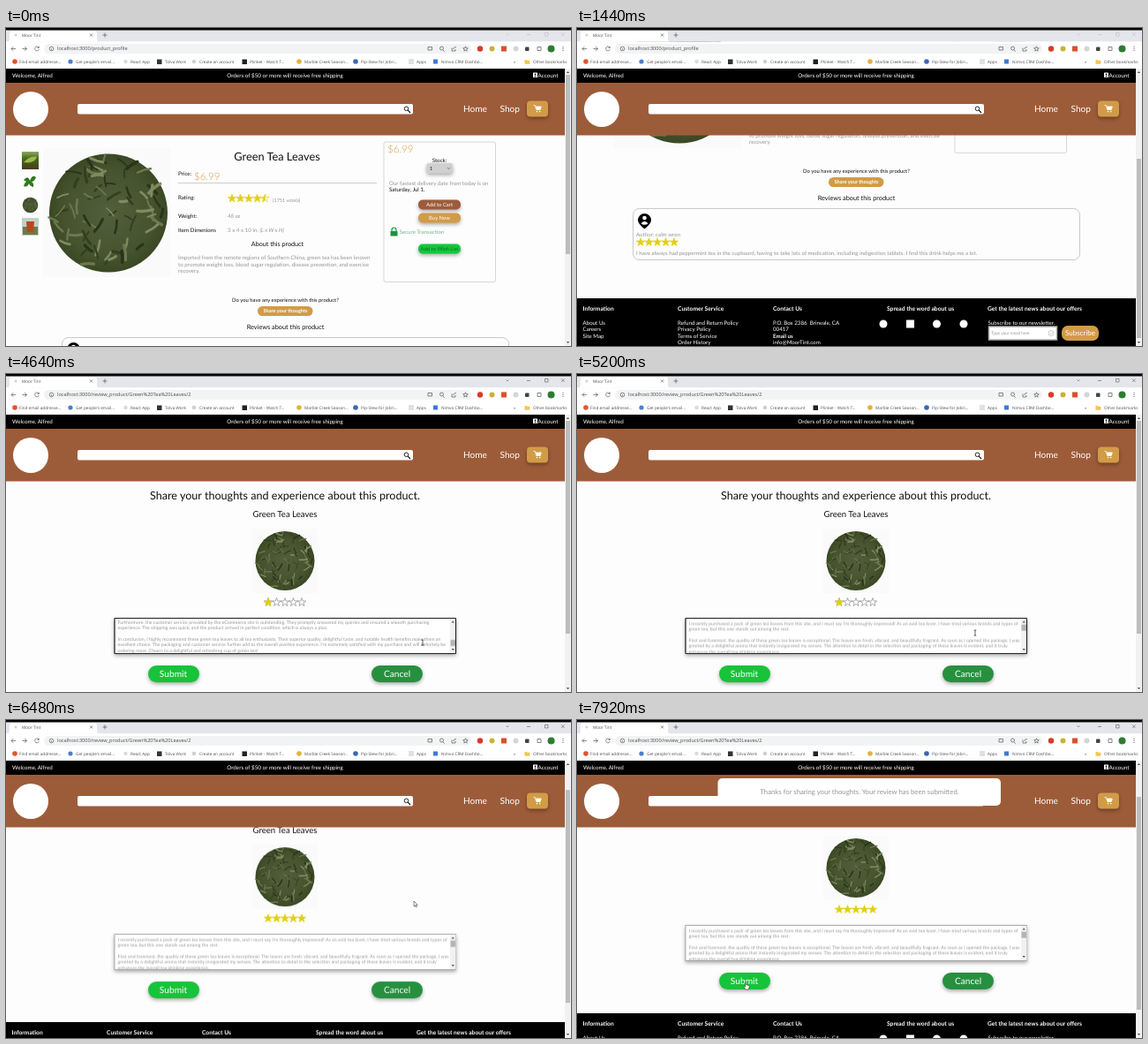
An HTML page that plays this animation: 640x360 px, repeating every 8 s.

```html
<!DOCTYPE html>
<html lang="en">
<head>
<meta charset="utf-8">
<title>Moor Tint</title>
<style>
html, body { margin: 0; width: 100%; height: 100%; overflow: hidden; background: #fdfdfd; }
svg { display: block; width: 640px; height: 360px; }
text { font-family: Lato, "Open Sans", sans-serif; font-size: 6.2px; fill: #111; text-rendering: geometricPrecision; white-space: pre; }
.ui text { font-family: "Open Sans", "Noto Sans", sans-serif; font-size: 4.7px; fill: #4a4d51; }
.mid { text-anchor: middle; }
.grey, .grey text { fill: #959595; }
.white, .white text { fill: #fff; }
.bold { font-weight: 700; }
.gold { fill: #d29b48; }
.price { font-size: 11.5px; font-weight: 300; }
.head text { font-size: 6.7px; font-weight: 700; }
.note text { font-size: 5.25px; fill: #969696; }
.lift { filter: drop-shadow(0 2px 2px #0005); }
.line { fill: none; stroke: #555; stroke-width: .7; }
.lit { fill: #dfd010; stroke: #dfd010; stroke-width: .6; }

/* hard switches */
.step { animation: 8s step-end infinite; }
.pageA { animation-name: pageA; }
.pageB { animation-name: pageB; }
.active { animation-name: active; }
.focus { animation-name: focus; }
.hint { animation-name: hint; }
.filled { animation-name: filled; }
.rated { animation-name: rated; }
.hand { animation-name: hand; }
.beam { animation-name: beam; }
.arrow { animation-name: arrow; }
@keyframes pageA { 0% { opacity: 1 } 28% { opacity: 0 } }
@keyframes pageB { 0% { opacity: 0 } 28% { opacity: 1 } }
@keyframes active { 0% { opacity: .25 } 23% { opacity: .85 } }
@keyframes focus { 0% { opacity: 0 } 38% { opacity: 1 } 74% { opacity: 0 } }
@keyframes hint { 0% { opacity: 1 } 47% { opacity: 0 } }
@keyframes filled { 0% { opacity: 0 } 47% { opacity: 1 } }
@keyframes rated { 0% { opacity: 0 } 73% { opacity: 1 } }
@keyframes hand { 0% { opacity: 0 } 20% { opacity: 1 } 28% { opacity: 0 } 73% { opacity: 1 } 77% { opacity: 0 } 90.8% { opacity: 1 } }
@keyframes beam { 0% { opacity: 0 } 31% { opacity: 1 } 66.5% { opacity: 0 } }
@keyframes arrow { 0% { opacity: 0 } 28% { opacity: 1 } 31% { opacity: 0 } 66.5% { opacity: 1 } 73% { opacity: 0 } 77% { opacity: 1 } 90.8% { opacity: 0 } }

/* smooth moves; --d is the full distance */
.scrollA { animation: scrollA 8s linear infinite; }
.scrollB { animation: scrollB 8s linear infinite; }
.scrollT { animation: scrollT 8s linear infinite; }
.toast { animation: toast 8s ease-out infinite; }
.ptr { animation: ptr 8s ease-in-out infinite; }
@keyframes scrollA {
  0%, 11.5% { transform: translateY(0); animation-timing-function: ease-in-out }
  18%, 100% { transform: translateY(var(--d)) }
}
@keyframes scrollB {
  0%, 77.5% { transform: translateY(0) }
  81%, 82% { transform: translateY(calc(var(--d) * .77)) }
  86%, 100% { transform: translateY(var(--d)) }
}
@keyframes scrollT {
  0%, 58.3% { transform: translateY(var(--d)) }
  64%, 100% { transform: translateY(0) }
}
@keyframes toast {
  0%, 93.7% { transform: translateY(-15px); opacity: 0 }
  98.5%, 100% { transform: translateY(0); opacity: 1 }
}
@keyframes ptr {
  0%, 22% { transform: translate(322px, 174px) }
  28% { transform: translate(318px, 176px) }
  32.5%, 47% { transform: translate(216px, 282px) }
  57%, 59% { transform: translate(472px, 304px) }
  65% { transform: translate(451px, 293px) }
  68% { transform: translate(400px, 335px) }
  69.5% { transform: translate(384px, 322px) }
  73.5%, 76.5% { transform: translate(336px, 257px) }
  80.5%, 82% { transform: translate(462px, 205px) }
  88.5% { transform: translate(456px, 296px) }
  92%, 100% { transform: translate(191px, 297px) }
}
</style>
</head>
<body>
<svg viewBox="0 0 640 360">
<defs>
  <radialGradient id="leafy">
    <stop offset="0" stop-color="#525f3c"/><stop offset=".75" stop-color="#46532f"/><stop offset="1" stop-color="#3a4823"/>
  </radialGradient>
  <linearGradient id="field" x2="0" y2="1">
    <stop offset="0" stop-color="#8ea860"/><stop offset=".4" stop-color="#3f6a1e"/><stop offset="1" stop-color="#4a3a1c"/>
  </linearGradient>
  <clipPath id="box"><rect x="124" y="277" width="378" height="38.5"/></clipPath>
  <path id="star" d="M0-5L1.2-1.6 4.8-1.5 1.9.6 2.9 4 0 2-2.9 4-1.9.6-4.8-1.5-1.2-1.6Z"/>
  <g id="five">
    <use href="#star" x="-19"/><use href="#star" x="-9.5"/><use href="#star"/><use href="#star" x="9.5"/><use href="#star" x="19"/>
  </g>
  <g id="tea"><circle r="67" fill="url(#leafy)"/></g>
  <g id="footer">
    <rect width="634" height="70"/>
    <g class="white">
      <g class="head">
        <text x="6.5" y="13.8">Information</text>
        <text x="114" y="13.8">Customer Service</text>
        <text x="222" y="13.8">Contact Us</text>
        <text x="351" y="13.8">Spread the word about us</text>
        <text x="465" y="13.8">Get the latest news about our offers</text>
      </g>
      <text x="6.5" y="29.5">About Us</text>
      <text x="6.5" y="37">Careers</text>
      <text x="6.5" y="44.5">Site Map</text>
      <text x="114" y="29.5">Refund and Return Policy</text>
      <text x="114" y="37">Privacy Policy</text>
      <text x="114" y="44.5">Terms of Service</text>
      <text x="114" y="52">Order History</text>
      <text x="222" y="29.5">P.O. Box 2386  Brinvale, CA</text>
      <text x="222" y="37">00417</text>
      <text x="222" y="44.5" class="bold">Email us</text>
      <text x="222" y="52">info@MoorTint.com</text>
      <circle cx="347" cy="29" r="4.5"/><rect x="373" y="24.5" width="9" height="9"/>
      <circle cx="407.5" cy="29" r="4.5"/><circle cx="438" cy="29" r="4.5"/>
      <text x="465.5" y="29.5">Subscribe to our newsletter.</text>
    </g>
    <rect x="466.5" y="32" width="77" height="15" fill="#fff" stroke="#aaa" stroke-width="1.5"/>
    <text x="469" y="41" class="grey" style="font-size:4.8px">Type your email here</text>
    <circle cx="537" cy="39.5" r="3" fill="none" stroke="#aaa" stroke-width=".6"/>
    <path d="M535.5 39.5l1.2 1.2 2-2.5" fill="none" stroke="#aaa" stroke-width=".6"/>
    <rect x="549" y="31" width="42" height="17" rx="7" class="gold"/>
    <text x="570" y="42.3" class="mid white" style="font-size:8px">Subscribe</text>
  </g>
</defs>

<rect width="640" height="360" fill="#fdfdfd"/>

<!-- product page -->
<g class="step pageA"><g class="scrollA" style="--d:-146px">
  <rect x="18" y="140" width="19" height="20" fill="url(#field)"/>
  <path d="M20 152q8-8 15-6-3 8-15 6z" fill="#a3b545"/>
  <path d="M20 172q5-6 7 1 3-8 7-4-2 5-5 5 3 2 2 6-4-1-5-4-2 5-6 3 1-4 3-5z" fill="#2f7a1c"/>
  <use href="#tea" transform="translate(27.5 200.5) scale(.13)"/>
  <rect x="18" y="215" width="19" height="20" fill="#c3cfc6"/>
  <path d="M19 225h17v9h-17z" fill="#6e7a4b"/><path d="M23 219h9l-1 12h-7z" fill="#b4491f"/>
  <rect x="42" y="136" width="144" height="146" fill="#fafafa"/>
  <use href="#tea" transform="translate(116 209.5)"/>

  <text x="307" y="150" class="mid" style="font-size:12.8px">Green Tea Leaves</text>
  <text x="195" y="167">Price:</text>
  <text x="213" y="172" class="gold price">$6.99</text>
  <path d="M195 175.5h225" stroke="#b8b8b8" stroke-width=".7"/>
  <text x="195" y="193.5">Rating:</text>
  <g class="lit">
    <use href="#star" x="256" y="193"/><use href="#star" x="265.5" y="193"/><use href="#star" x="275" y="193"/><use href="#star" x="284.5" y="193"/>
    <path d="M293.5 188v7l-2.9 2 1-3.4-2.9-2.1 3.6-.1z"/>
    <path d="M293.5 188l1.2 3.4 3.6.1-2.9 2.1 1 3.4-2.9-2" style="fill:none"/>
  </g>
  <text x="302" y="197" class="grey" style="font-size:5.5px">(1751 vote(s)</text>
  <text x="195" y="215">Weight:</text>
  <text x="251" y="215" class="grey" font-style="italic">48 oz</text>
  <text x="195" y="231">Item Dimenions</text>
  <text x="251" y="231" class="grey">3 x 4 x 10 in. <tspan font-style="italic">(L x W x H)</tspan></text>
  <text x="307.5" y="247" class="mid" style="font-size:7.2px">About this product</text>
  <g class="grey">
    <text x="195" y="262.3">Imported from the remote regions of Southern China, green tea has been known</text>
    <text x="195" y="269.5">to promote weight loss, blood sugar regulation, disease prevention, and exercise</text>
    <text x="195" y="276.8">recovery.</text>
  </g>

  <rect x="428" y="129" width="126.5" height="158.5" rx="2" fill="none" stroke="#c6c6c6" stroke-width=".7"/>
  <text x="432" y="141" class="gold price">$6.99</text>
  <text x="491" y="151.8" class="mid">Stock:</text>
  <rect x="476.5" y="153" width="29.5" height="11.5" rx="2.5" fill="#d0d0d0" class="lift"/>
  <text x="480" y="160.8" style="font-size:5.5px">1</text>
  <path d="M500 158l1.7 1.7 1.7-1.7" class="line"/>
  <text x="434" y="177.7" class="grey">Our fastest delivery date from today is on</text>
  <text x="434" y="185">Saturday, Jul 1.</text>
  <rect x="467" y="194.5" width="48" height="11" rx="5" fill="#9d5c39" class="lift"/>
  <text x="491" y="202.2" class="mid white" style="font-size:5.9px">Add to Cart</text>
  <rect x="467" y="209.5" width="48" height="11" rx="5" class="gold lift"/>
  <text x="491" y="217.2" class="mid white" style="font-size:5.9px">Buy Now</text>
  <path d="M437 231v-2.5a2.5 2.5 0 0 1 5 0v2.5" fill="none" stroke="#15953c" stroke-width="1.2"/>
  <rect x="435.5" y="230" width="8" height="5.5" rx=".6" fill="#15953c"/>
  <text x="445.5" y="233" style="fill:#76b38f">Secure Transaction</text>
  <rect x="467" y="244.5" width="48" height="11" rx="5" fill="#12c83c" class="lift"/>
  <text x="491" y="252.2" class="mid" style="font-size:5.9px;fill:#0b6a26">Add to Wish List</text>

  <text x="316.5" y="309.5" class="mid" style="font-size:5.9px">Do you have any experience with this product?</text>
  <rect x="285" y="315" width="62.5" height="11" rx="5.5" class="gold"/>
  <text x="316.5" y="322.3" class="mid white bold" style="font-size:5.6px">Share your thoughts</text>
  <text x="316.5" y="341" class="mid" style="font-size:7.35px">Reviews about this product</text>
  <rect x="63.5" y="350.5" width="506" height="58" rx="7" fill="none" stroke="#bbb" stroke-width=".8"/>
  <path d="M76.5 373.5q-7.5-6-7.5-10a7.5 7.5 0 0 1 15 0q0 4-7.5 10z"/>
  <g class="white"><circle cx="76.5" cy="361" r="2.3"/><path d="M72.5 367.3q4-4.5 8 0-4 3-8 0z"/></g>
  <text x="67" y="381.7" class="grey">Author: calm wren</text>
  <use href="#five" x="91" y="388.5" class="lit"/>
  <text x="67" y="402.7" class="grey" style="font-size:6.15px">I have always had peppermint tea in the cupboard, having to take lots of medication, including indigestion tablets. I find this drink helps me a lot.</text>
  <use href="#footer" y="452"/>
</g></g>

<!-- review page -->
<g class="step pageB"><g class="scrollB" style="--d:-44px">
  <rect y="121" width="634" height="260" fill="#fdfdfd"/>
  <text x="316" y="141.8" class="mid" style="font-size:12.6px">Share your thoughts and experience about this product.</text>
  <text x="316" y="161.8" class="mid" style="font-size:9.6px">Green Tea Leaves</text>
  <rect x="279" y="175" width="74" height="73" fill="#fafafa"/>
  <use href="#tea" transform="translate(316 211.5) scale(.5)"/>
  <use href="#five" x="316" y="258.5" fill="#fff" stroke="#777" stroke-width=".6"/>
  <use href="#star" x="297" y="258.5" class="lit"/>
  <g class="step rated">
    <rect x="290" y="252" width="52" height="13" fill="#fdfdfd"/>
    <use href="#five" x="316" y="258.5" class="lit"/>
  </g>

  <rect x="123" y="276.5" width="386.5" height="40" fill="#fff" stroke="#999" stroke-width=".8" class="lift"/>
  <text x="126.5" y="285.5" class="step hint" style="font-size:5.3px;fill:#aaa">Say something</text>
  <g class="step filled">
    <g clip-path="url(#box)"><g id="note" class="note scrollT"></g></g>
    <rect x="503" y="277" width="6.5" height="39" fill="#f1f1f1"/>
    <path d="M504.5 281.5l1.7-2 1.7 2zM504.5 311l1.7 2 1.7-2z" fill="#555"/>
    <rect x="503.5" y="283.7" width="5.5" height="7" fill="#b5b5b5" class="scrollT" style="--d:17.2px"/>
  </g>
  <rect x="123" y="276.5" width="386.5" height="40" rx=".8" fill="none" stroke="#222" stroke-width="1.1" class="step focus"/>

  <rect x="161" y="330" width="58" height="19" rx="9.5" fill="#17c33a" class="lift"/>
  <text x="189.5" y="343" class="mid white" style="font-size:10.2px">Submit</text>
  <rect x="414" y="330" width="58" height="19" rx="9.5" fill="#27903f" class="lift"/>
  <text x="443" y="343" class="mid white" style="font-size:10.2px">Cancel</text>
  <use href="#footer" y="376"/>
</g></g>

<!-- site header -->
<rect y="46" width="634" height="16"/>
<text x="7" y="56" class="white" style="font-size:6.3px">Welcome, Alfred</text>
<text x="316" y="56" class="mid white" style="font-size:6.3px">Orders of $50 or more will receive free shipping</text>
<rect x="597" y="50.5" width="5" height="5.5" rx=".5" class="white"/>
<circle cx="599.5" cy="52.5" r=".9"/><path d="M598 55.3q1.5-2 3 0z"/>
<text x="602.5" y="56" class="white" style="font-size:6.3px">Account</text>
<rect y="62" width="634" height="59.5" fill="#9d5c39"/>
<circle cx="28" cy="92" r="20" class="white"/>
<rect x="81" y="86" width="380" height="11.5" rx="2" class="white"/>
<path d="M455.2 93.2l2.8 2.8" stroke="#111" stroke-width="1.2"/>
<circle cx="453.5" cy="91.3" r="2.3" fill="none" stroke="#111" stroke-width=".9"/>
<text x="518" y="95" class="white" style="font-size:10.1px">Home</text>
<text x="559.5" y="95" class="white" style="font-size:10.1px">Shop</text>
<rect x="590" y="82.5" width="24" height="18" rx="4" class="gold lift"/>
<path d="M597.5 87.5h1.8l1.4 5h4.500l1.100-3.500h-6" fill="none" stroke="#fff" stroke-width=".8"/>
<g class="white"><path d="M600 89h6.300l-1.100 3.500h-4.200z"/><circle cx="601.5" cy="94.6" r=".8"/><circle cx="604.7" cy="94.6" r=".8"/></g>

<!-- page scrollbar -->
<rect x="633" y="46" width="7" height="314" fill="#f1f1f1"/>
<path d="M634.8 51l1.7-2 1.7 2zM634.8 355l1.7 2 1.7-2z" fill="#555"/>
<g class="step pageA"><rect x="634" y="53" width="5" height="203" fill="#bdbdbd" class="scrollA" style="--d:95px"/></g>
<g class="step pageB"><rect x="634" y="53" width="5" height="241" fill="#bdbdbd" class="scrollB" style="--d:34px"/></g>

<!-- browser frame -->
<g class="ui">
  <rect width="640" height="15.5" fill="#e5e6eb"/>
  <path d="M1 15.5q3 0 3-3v-6q0-3 3-3h93q3 0 3 3v6q0 3 3 3z" fill="#fff"/>
  <rect width="640" height="2.5"/>
  <circle cx="11" cy="8" r="1.5" fill="#d8cfc8"/>
  <text x="18" y="9.8">Moor Tint</text>
  <path d="M95 6.5l3 3m0-3l-3 3M109.5 8h5m-2.5-2.5v5" class="line"/>
  <path d="M566.5 6.5l1.5 1.5 1.5-1.5M590 7.5h4M610.5 5.5h3.5v3.5h-3.5zM629 5.5l3.6 3.6m0-3.6l-3.6 3.6" class="line step active"/>
  <rect y="15.5" width="640" height="30.5" fill="#fff"/>
  <rect x="43" y="18" width="484" height="11" rx="5.5" fill="#f1f3f4"/>
  <path d="M11 23.5h-5m2.3-2.3l-2.3 2.3 2.3 2.3M18.5 23.5h5m-2.3-2.3l2.3 2.3-2.3 2.3M37 22a2.4 2.4 0 1 0 .3 2.2M37.3 20.8v1.7h-1.7" class="line"/>
  <circle cx="51.5" cy="23.5" r="2.3" class="line"/><path d="M51.5 23.2v1.5" class="line"/>
  <text x="58" y="25.4" class="step pageA" style="font-size:5.6px">localhost:3000/product_profile</text>
  <text x="58" y="25.4" class="step pageB" style="font-size:5.6px">localhost:3000/review_product/Green%20Tea%20Leaves/2</text>
  <path d="M478 21.5h4.5v3.5h-4.5zM495 25l1.7 1.7M505 22.5v3.5h4v-2M506.5 24q.5-2.5 3.5-2.5M520.5 20.8l.8 1.9 2 .1-1.6 1.3.5 2-1.7-1.1-1.7 1.1.5-2-1.6-1.3 2-.1z" class="line"/>
  <circle cx="493.5" cy="23" r="2" class="line"/>
  <circle cx="537" cy="23.5" r="3.2" fill="#d93a2b"/><circle cx="550.5" cy="23.5" r="3" fill="#c9b23a"/>
  <rect x="561" y="20.5" width="6" height="6" fill="#d8512c"/><circle cx="577.5" cy="23.5" r="3" fill="#d5d5d5"/>
  <rect x="588" y="21.5" width="4.5" height="4.5" rx=".8" fill="#444"/><path d="M602 21.5h4v4h-4z" class="line"/>
  <circle cx="617.5" cy="23.5" r="4" fill="#2e7d32"/>
  <g fill="#444"><circle cx="631" cy="21.5" r=".6"/><circle cx="631" cy="23.5" r=".6"/><circle cx="631" cy="25.5" r=".6"/></g>

  <circle cx="10" cy="38" r="2.8" fill="#e0542c"/><text x="15" y="39.7">Find email addresse...</text>
  <circle cx="73" cy="38" r="2.6" fill="#4a7fd0"/><text x="79" y="39.7">Get people's email...</text>
  <circle cx="135.5" cy="38" r="2.2" fill="#dadada"/><text x="141" y="39.7">React App</text>
  <rect x="171" y="35.5" width="5.5" height="5.5" fill="#333"/><text x="180" y="39.7">Tolva Work</text>
  <circle cx="213" cy="38" r="2.2" fill="#cfcfcf"/><text x="219" y="39.7">Create an account</text>
  <rect x="267.5" y="35.5" width="5.5" height="5.5" fill="#222"/><text x="276" y="39.7">Plinket - Watch T...</text>
  <circle cx="332" cy="38" r="2.8" fill="#e3b23c"/><text x="338" y="39.7">Marble Creek Season...</text>
  <circle cx="396" cy="38" r="2.8" fill="#3c66b0"/><text x="402" y="39.7">Pip-Stew for Jobri...</text>
  <path d="M456.5 36h5m-5 2h5m-5 2h5" class="line" stroke-dasharray="1 1"/><text x="465" y="39.7">Apps</text>
  <rect x="484" y="35.5" width="5" height="5" fill="#3f78d8"/><text x="493" y="39.7">Nimvo CRM Dashbo...</text>
  <text x="575" y="39.7">»</text>
  <path d="M587.5 36h2l.8.8h3v4h-5.8z" fill="#f2c550"/><text x="597" y="39.7">Other bookmarks</text>
</g>

<g class="toast">
  <rect x="159.5" y="66" width="320.5" height="31" rx="5" fill="#fff"/>
  <text x="320" y="84.3" class="mid grey" style="font-size:7.75px">Thanks for sharing your thoughts. Your review has been submitted.</text>
</g>

<g class="ptr">
  <path class="step beam" d="M-1.3-3h2.6M0-3v6M-1.3 3h2.6" stroke="#222" stroke-width=".7"/>
  <path class="step arrow" d="M0 0v6l1.4-1.2 1 2.2 1-.5-1-2.1h1.8z" fill="#fff" stroke="#111" stroke-width=".5"/>
  <path class="step hand" d="M-.3 0q.8-.6 1.2.2v2.6l2.7.8q.8.4.5 1.5l-.6 2.9h-3.6l-2-3q.3-.9 1.3-.2l.5.4z" fill="#fff" stroke="#111" stroke-width=".5"/>
</g>
</svg>

<script>
const NS = "http://www.w3.org/2000/svg";
const add = (parent, tag, attrs) => {
  const el = parent.appendChild(document.createElementNS(NS, tag));
  for (const k in attrs) el.setAttribute(k, attrs[k]);
  return el;
};

// loose tea: seeded flakes on the disc
let seed = 7;
const rnd = () => (seed = seed * 16807 % 2147483647) / 2147483647;
const tones = ["#28341a", "#6b7850", "#323f20", "#7f8b5f"];
const tea = document.getElementById("tea");
for (let i = 0; i < 72; i++) {
  const a = rnd() * 6.283, r = 63 * Math.sqrt(rnd()), t = rnd() * 6.283, l = 4 + rnd() * 5;
  const x = r * Math.cos(a), y = r * Math.sin(a), dx = l * Math.cos(t), dy = l * Math.sin(t);
  add(tea, "path", {
    d: `M${x - dx} ${y - dy}Q${x + dy * .2} ${y - dx * .2} ${x + dx} ${y + dy}`,
    fill: "none", stroke: tones[i % 4], "stroke-width": 1.5 + rnd() * 2, "stroke-linecap": "round"
  });
}

const review = `I recently purchased a pack of green tea leaves from this site, and I must say I'm thoroughly impressed! As an avid tea lover, I have tried various brands and types of
green tea, but this one stands out among the rest.

First and foremost, the quality of these green tea leaves is exceptional. The leaves are fresh, vibrant, and beautifully fragrant. As soon as I opened the package, I was
greeted by a delightful aroma that instantly invigorated my senses. The attention to detail in the selection and packaging of these leaves is evident, and it truly
enhances the overall tea drinking experience.

When it comes to taste, this green tea is simply outstanding. It has a smooth and well balanced flavor with a subtle hint of sweetness. Each sip is refreshing and
leaves a pleasant aftertaste. I enjoy it both hot and iced, and it never turns bitter.

The health benefits are another reason to love this tea. It is rich in antioxidants and helps me feel energized through the day. I have noticed an improvement
in my focus and my digestion since I started to drink it regularly.

Furthermore, the customer service provided by the eCommerce site is outstanding. They promptly answered my queries and ensured a smooth purchasing
experience. The shipping was quick, and the product arrived in perfect condition, which is always a plus.

In conclusion, I highly recommend these green tea leaves to all tea enthusiasts. Their superior quality, delightful taste, and notable health benefits make them an
excellent choice. The packaging and customer service further add to the overall positive experience. I'm extremely satisfied with my purchase and will definitely be
ordering more. Cheers to a delightful and refreshing cup of green tea!`;
const note = document.getElementById("note"), lines = review.split("\n"), pitch = 6.3;
lines.forEach((s, i) => add(note, "text", { x: 126.5, y: 284.6 + i * pitch }).textContent = s);
note.style.setProperty("--d", `${30 - (lines.length - 1) * pitch}px`);
</script>
</body>
</html>
```
